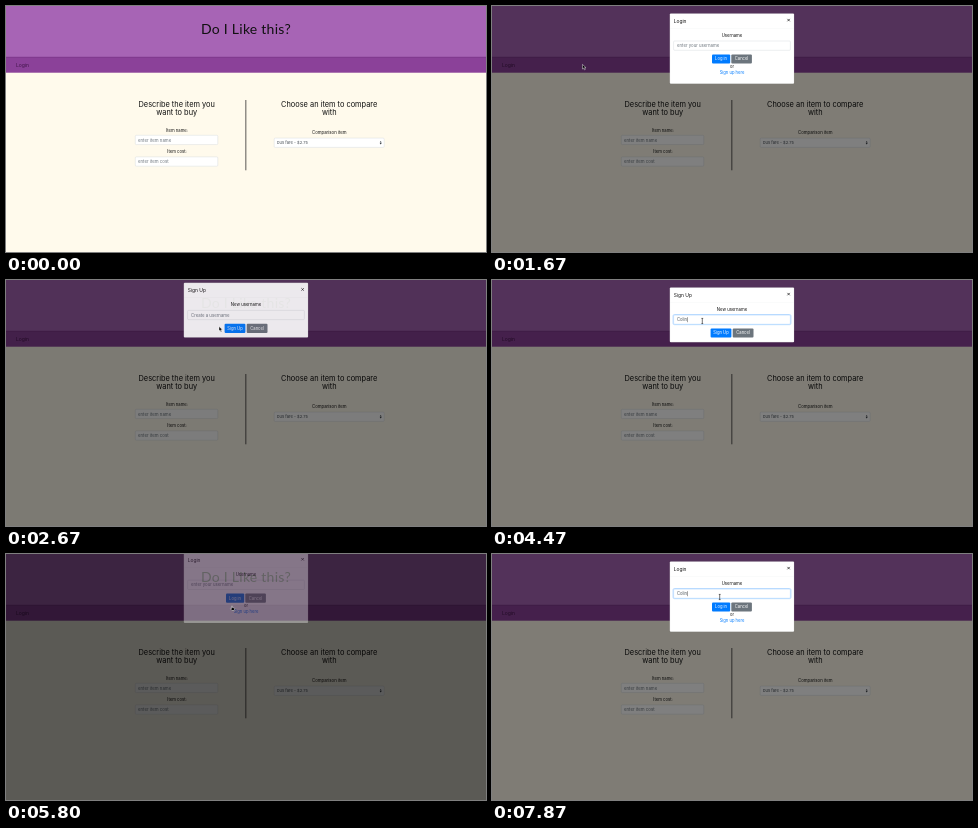
An HTML page for the animation above (8 s loop, 480 px wide and 246 px high).

```html
<!DOCTYPE html>
<html lang="en">
<head>
<meta charset="utf-8">
<title>Do I Like this?</title>
<style>
  html, body { margin: 0; width: 100%; height: 100%; overflow: hidden; background: #fffaec; }
  svg { display: block; width: 100%; height: 100%; font-family: Inter, sans-serif; }
</style>
</head>
<body>
<svg id="stage" viewBox="0 0 480 246" xmlns="http://www.w3.org/2000/svg"></svg>
<script>
const LOOP = 8000;
const USER = 'Colin';
const NS = 'http://www.w3.org/2000/svg';
const stage = document.getElementById('stage');

function el(parent, tag, attrs, content) {
  const node = document.createElementNS(NS, tag);
  for (const key in attrs) node.setAttribute(key, attrs[key]);
  if (content) node.textContent = content;
  return parent.appendChild(node);
}
const group = parent => el(parent, 'g', {});
const rect = (parent, x, y, width, height, fill, more) =>
  el(parent, 'rect', { x, y, width, height, fill, ...more });
const text = (parent, x, y, size, content, fill = '#111', more) =>
  el(parent, 'text', { x, y, 'font-size': size, fill, ...more }, content);
const centered = (parent, x, y, size, content, fill) =>
  text(parent, x, y, size, content, fill, { 'text-anchor': 'middle' });
const field = (parent, x, y, width, height = 9.3) =>
  rect(parent, x, y, width, height, '#fff', { rx: 1, stroke: '#ced4da', 'stroke-width': 0.4 });

const clamp = v => Math.min(1, Math.max(0, v));
const ramp = (t, start, length = 150) => clamp((t - start) / length);

// cubic-bezier(0, 0, .58, 1)
function easeOut(p) {
  let lo = 0, hi = 1;
  for (let i = 0; i < 16; i++) {
    const u = (lo + hi) / 2;
    if (1.74 * (1 - u) * u * u + u * u * u < p) lo = u; else hi = u;
  }
  return 3 * (1 - lo) * lo * lo + lo * lo * lo;
}

function buildPage() {
  rect(stage, 0, 0, 480, 246, '#fffaec');
  rect(stage, 0, 0, 480, 51, '#a764b5');
  rect(stage, 0, 51, 480, 15.7, '#8b4199');
  rect(stage, 0, 50.8, 480, 0.7, '#783486');
  text(stage, 240, 28.3, 14, 'Do I Like this?', '#111', {
    'text-anchor': 'middle', 'font-family': 'Lato, sans-serif', 'letter-spacing': 0.25
  });
  text(stage, 10, 60.6, 5, 'Login', '#411549');

  centered(stage, 170.7, 101.2, 7.4, 'Describe the item you');
  centered(stage, 170.7, 109.3, 7.4, 'want to buy');
  centered(stage, 171, 125.6, 4.2, 'Item name:');
  centered(stage, 171, 147.2, 4.2, 'Item cost:');
  field(stage, 129.3, 129.3, 82.5);
  field(stage, 129.3, 150.9, 82.5);
  text(stage, 132, 135.6, 4.35, 'enter item name', '#6c757d');
  text(stage, 132, 157.2, 4.35, 'enter item cost', '#6c757d');

  rect(stage, 239.2, 94, 1.2, 70.3, '#77736e');

  centered(stage, 323.2, 101.2, 7.4, 'Choose an item to compare');
  centered(stage, 323.2, 109.3, 7.4, 'with');
  centered(stage, 323.3, 128.4, 4.3, 'Comparison item');
  field(stage, 268.2, 132.1, 110);
  text(stage, 271, 138.3, 4.1, 'bus fare - $2.75', '#495057');
  el(stage, 'path', { d: 'M373.7 136.4h2l-1-1.4zM373.7 137.1h2l-1 1.4z', fill: '#343a40' });
}

const dialogs = [
  { kind: 'login', open: 1080, close: 2377, focus: Infinity, keys: [] },
  { kind: 'signup', open: 2377, close: 5585, focus: 3100, keys: [3600, 3870, 4070, 4330, 4470] },
  { kind: 'login', open: 5585, close: Infinity, focus: 6450, keys: [7100, 7330, 7530, 7730, 7870] }
];

function button(parent, x, width, label, fill) {
  const face = rect(parent, x, 41, width, 9.2, fill, { rx: 1 });
  centered(parent, x + width / 2, 47.1, 4.15, label, '#fff');
  return face;
}

function buildDialog(d) {
  const login = d.kind === 'login';
  const g = d.g = group(stage);
  rect(g, 177.8, 0, 124.3, login ? 70.3 : 54.8, '#fff', { rx: 1, stroke: '#000', 'stroke-opacity': 0.2, 'stroke-width': 0.3 });
  rect(g, 178, 14.6, 124, 0.25, '#e9ecef');
  text(g, 181.7, 9.2, 4.9, login ? 'Login' : 'Sign Up');
  el(g, 'path', { d: 'M295.4 5.5l2.4 2.4m0-2.4l-2.4 2.4', stroke: '#222', 'stroke-width': 0.75 });
  centered(g, 240, 23.7, 4.25, login ? 'Username' : 'New username');

  d.glow = rect(g, 181, 27.1, 118, 10.2, 'none', { rx: 1.4, stroke: '#bfdeff', 'stroke-width': 0.9 });
  d.box = field(g, 181.6, 27.6, 116.8);
  d.hint = text(g, 185, 33.8, 4.3, login ? 'enter your username' : 'Create a username', '#6c757d');
  d.value = text(g, 185, 33.8, 4.2, '', '#495057');
  d.caret = rect(g, 185, 29.8, 0.45, 5, '#333');

  if (login) {
    d.main = button(g, 220, 18.2, 'Log in', '#007bff');
    button(g, 239.3, 20.6, 'Cancel', '#6c757d');
    centered(g, 240, 54.8, 4.1, 'or');
    centered(g, 240, 60.8, 4.15, 'Sign up here', '#007bff');
  } else {
    d.main = button(g, 218.6, 20.8, 'Sign Up', '#007bff');
    button(g, 240.7, 20.8, 'Cancel', '#6c757d');
  }
}

function drawDialog(d, t) {
  const shown = d.open + 160;
  d.shade.setAttribute('opacity', 0.5 * (ramp(t, d.open) - ramp(t, d.close + 150)));
  const opacity = ramp(t, shown) - ramp(t, d.close);
  d.g.setAttribute('opacity', opacity);
  if (!opacity) return;

  const rise = 1 - easeOut(ramp(t, shown, 300)) + easeOut(ramp(t, d.close, 300));
  d.g.setAttribute('transform', `translate(0 ${7.4 - 12.4 * rise})`);

  const focused = t >= d.focus;
  const typed = USER.slice(0, d.keys.filter(k => t >= k).length);
  const glow = ramp(t, d.focus);
  d.glow.setAttribute('opacity', glow);
  d.box.setAttribute('stroke', glow > 0.5 ? '#80bdff' : '#ced4da');
  d.hint.setAttribute('opacity', typed ? 0 : 1);
  d.value.textContent = typed;
  d.caret.setAttribute('opacity', focused ? 1 : 0);
  d.caret.setAttribute('x', 185.2 + (typed ? d.value.getComputedTextLength() : 0));
}

// time, x, y, pointer shape from then on
const path = [
  [470, 486, 140, 'arrow'], [620, 402, 114, 'arrow'], [960, 17, 57, 'hand'], [1400, 17, 57, 'arrow'],
  [2080, 227, 61, 'hand'], [2500, 227, 61, 'arrow'], [2670, 213, 46.5, 'arrow'], [3000, 214, 42, 'ibeam'],
  [3120, 214, 42, 'arrow'], [3200, 232, 50, 'arrow'], [3400, 232, 50, 'hand'], [3540, 232, 50, 'arrow'],
  [3600, 250, 48, 'arrow'], [3870, 256, 51, 'arrow'], [4270, 210.3, 41, 'ibeam'], [5070, 210.3, 41, 'arrow'],
  [5400, 226, 51.5, 'hand'], [5930, 226, 51.5, 'arrow'], [6330, 227.7, 43, 'ibeam'], [LOOP, 227.7, 43, 'ibeam']
];

const shapes = {};
function buildPointers() {
  const outline = { stroke: '#fff', 'stroke-width': 0.45, 'stroke-linejoin': 'round' };
  shapes.arrow = el(stage, 'path', { d: 'M0 0v4.6l1.1-1 .8 1.8.9-.4-.8-1.7h1.5z', fill: '#000', ...outline });
  shapes.hand = el(stage, 'path', {
    d: 'M-.4.3q.4-.6.8 0v1.7l1.9.5q.4.2.3.7l-.4 1.8h-2.3l-1.5-2q.2-.7 1.2 0z', fill: '#000', ...outline
  });
  shapes.ibeam = el(stage, 'path', {
    d: 'M-.9-2.6h1.8M0-2.6v5.2M-.9 2.6h1.8', fill: 'none', stroke: '#000', 'stroke-width': 0.55
  });
}

function drawPointer(t) {
  const i = path.findIndex((p, n) => n < path.length - 1 && t >= p[0] && t < path[n + 1][0]);
  for (const name in shapes) shapes[name].setAttribute('visibility', i >= 0 && path[i][3] === name ? 'visible' : 'hidden');
  if (i < 0) return;
  const [t0, x0, y0, shape] = path[i], [t1, x1, y1] = path[i + 1];
  const p = (t - t0) / (t1 - t0), s = p * p * (3 - 2 * p);
  shapes[shape].setAttribute('transform', `translate(${x0 + (x1 - x0) * s} ${y0 + (y1 - y0) * s})`);
}

buildPage();
for (const d of dialogs) d.shade = rect(stage, 0, 0, 480, 246, '#000');
dialogs.forEach(buildDialog);

const status = group(stage);
rect(status, -1, 240, 118.6, 7, '#dedede', { stroke: '#aaa', 'stroke-width': 0.3, rx: 0.6 });
text(status, 1, 244.3, 3.6, 'file:///home/colin/Development/projects/doILikeThis/index.html#', '#444',
  { 'font-family': 'Roboto, sans-serif' });

buildPointers();

function draw(t) {
  for (const d of dialogs) drawDialog(d, t);
  dialogs[2].main.setAttribute('fill', t < 6000 ? '#0069d9' : '#007bff');
  status.setAttribute('opacity',
    ramp(t, 930, 100) - ramp(t, 1480) + ramp(t, 2080, 100) - ramp(t, 2440));
  drawPointer(t);
}

const start = performance.now();
function tick() {
  draw((performance.now() - start) % LOOP);
  requestAnimationFrame(tick);
}
tick();
</script>
</body>
</html>
```
